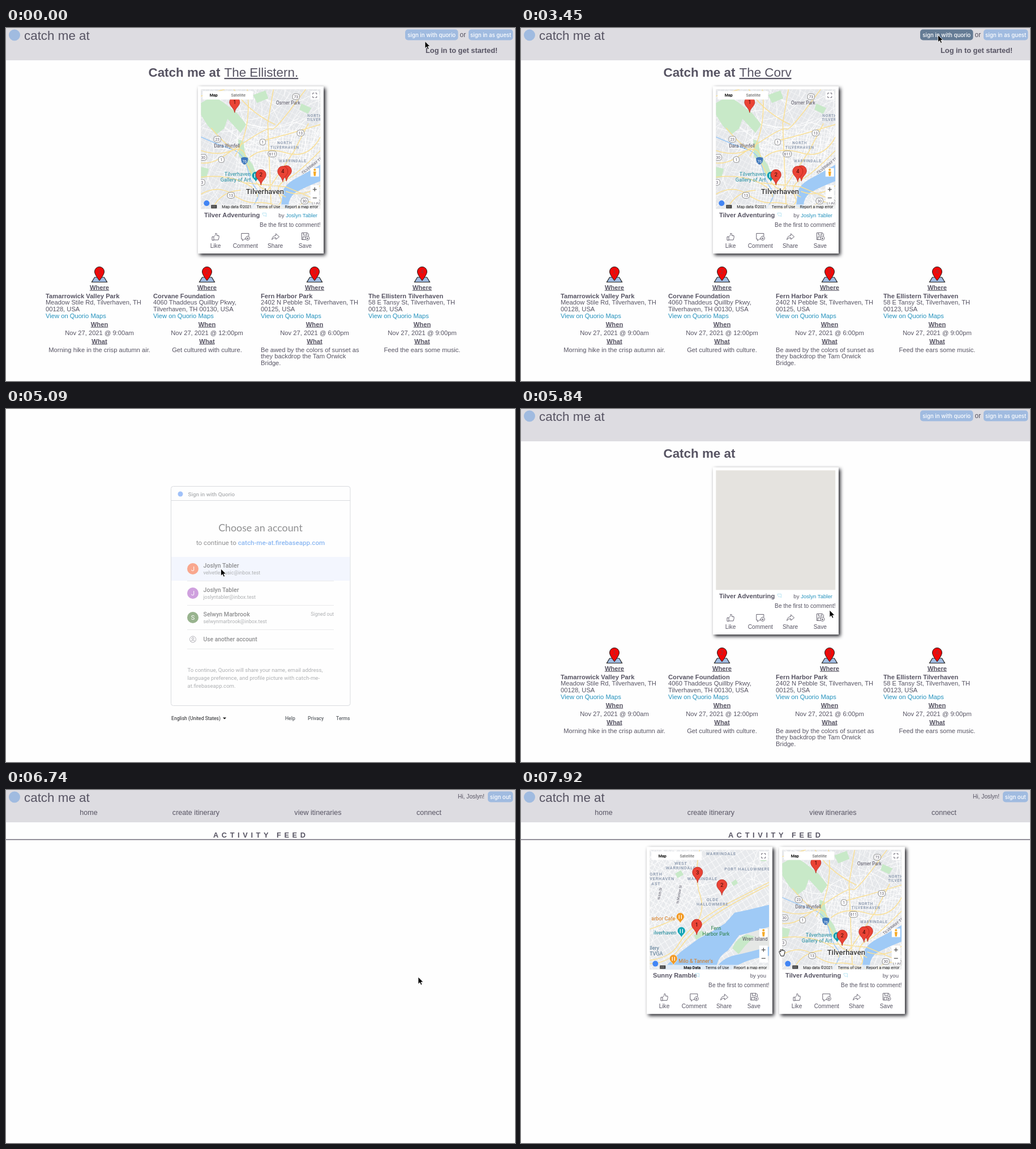
Recreate the animation shown at these times as an HTML page. Size 899 px wide and 623 px high, loop 8 s.

```html
<!DOCTYPE html>
<html lang="en">
<head>
<meta charset="utf-8">
<title>catch me at</title>
<style>
html, body { margin: 0; width: 100%; height: 100%; overflow: hidden; background: #fefefe; }
svg { display: block; font-family: "Liberation Sans", Arial, sans-serif; }
text { fill: #575463; white-space: pre; }
.b { font-weight: 700; }
.u { text-decoration: underline; }
.m { text-anchor: middle; }
.e { text-anchor: end; }
.link { fill: #2492bd; }
.btn text { font: 500 9.7px Inter, sans-serif; fill: #fff; }
.rob, .map { font-family: Roboto, sans-serif; }
.rob text { fill: #202124; }
.rob .soft { fill: #5f6368; }
.rob .url { fill: #1a73e8; font-weight: 500; }
.card { filter: drop-shadow(3px 3px 3px #1c1c22); }
.area { fill: #8493aa; letter-spacing: .8px; font-weight: 500; }
.ctl text { fill: #111; }
.icon { fill: none; stroke: #575463; stroke-width: .9; stroke-linejoin: round; }
.road { fill: none; stroke: #fff; }
.hwy { fill: none; stroke: #fae096; stroke-width: 1.5; }
</style>
</head>
<body>
<svg id="stage" width="899" height="623" viewBox="0 0 899 623"></svg>
<script>
const stage = document.getElementById('stage');
const text = (x, y, s, size = 11.2, cls = '', more = '') =>
  `<text x="${x}" y="${y}" font-size="${size}" class="${cls}" ${more}>${s}</text>`;
const rect = (x, y, w, h, fill, more = '') =>
  `<rect x="${x}" y="${y}" width="${w}" height="${h}" fill="${fill}" ${more}/>`;
const circle = (x, y, r, fill, more = '') => `<circle cx="${x}" cy="${y}" r="${r}" fill="${fill}" ${more}/>`;
const path = (d, more = '') => `<path d="${d}" ${more}/>`;
const group = (body, more = '') => `<g ${more}>${body}</g>`;
const at = (x, y, body, more = '') => group(body, `transform="translate(${x} ${y})" ${more}`);
const button = (x, w, label, id = '') =>
  group(rect(x, 2.5, w, 19, '#a0bbe0', `rx="5" id="${id}"`) + text(x + w / 2, 15.7, label, 9.7, 'm'), 'class="btn"');

// ---- maps
let seed = 7;
const rnd = () => (seed = seed * 16807 % 2147483647) / 2147483647;
const lanes = n => {
  let d = '';
  for (let i = 0; i < n; i++) {
    const x = rnd() * 211, y = rnd() * 211, a = rnd() * 7, l = 25 + rnd() * 50;
    d += `M${x} ${y}q${l * Math.cos(a)} ${l * Math.sin(a)} ${l * Math.cos(a + .5) * 1.8} ${l * Math.sin(a + .5) * 1.8}`;
  }
  return path(d, 'class="road" stroke-width="1"');
};
const grid = (id, gap, turn) =>
  `<pattern id="${id}" width="${gap}" height="${gap * 1.4}" patternUnits="userSpaceOnUse" patternTransform="rotate(${turn})">` +
  path(`M0 0H${gap}M0 0V${gap * 1.4}`, 'class="road" stroke-width="1.5"') + '</pattern>';
const green = d => path(d, 'fill="#c8e9c8"');
const water = d => path(d, 'fill="#9fcaf6"');
const shield = (n, x, y) => {
  const w = 8 + String(n).length * 2.2;
  return rect(x - w / 2, y - 5.2, w, 10.4, '#fff', 'rx="4" stroke="#777" stroke-width=".8"') + text(x, y + 2.5, n, 6.8, 'm');
};
const poi = (x, y, fill) =>
  at(x, y, path('M0 11C-1 6-7 4-7-1a7 7 0 0 1 14 0C7 4 1 6 0 11Z', `fill="${fill}" stroke="#fff" stroke-width=".6"`) +
    path('M-2-4V3M2-4V3', 'stroke="#fff" stroke-width="1.3"'));
const marker = (x, y, n) =>
  at(x, y, path('M0 0C-1.2-9-9-11-9-18.5a9 9 0 0 1 18 0C9-11 1.2-9 0 0Z', 'fill="#ea4335" stroke="#b7241b" stroke-width=".8"') +
    text(0, -15, n, 9.3, 'm', 'style="fill:#3a0b08"'));

const cityMap = () =>
  rect(0, 0, 211, 211, '#e5e7ea') + rect(0, 0, 211, 211, 'url(#g1)', 'opacity=".65"') +
  path('M62 90L118 72 211 65V150L140 200 60 205Z', 'fill="url(#g2)"') + lanes(75) +
  green('M0 24L22 12 38 22 64 42 80 62 70 77 58 64 47 52 41 69 27 80 12 64 0 45Z') +
  green('M66 88l9 4 3 22 14 20 7 20-8 4-10-22-14-18Z') + green('M92 10l22-8 5 14-20 8ZM177 25l18 8-6 10-15-7ZM0 137l14 3-4 15-10 2Z') +
  water('M211 133Q185 148 168 157T145 178L141 211H155Q153 190 169 181T211 162Z') +
  path('M0 84Q34 99 55 106T82 139 98 176 88 211', 'fill="none" stroke="#9fcaf6" stroke-width="1.5"') +
  path('M0 108Q30 118 55 108T80 130Q88 144 96 160T118 178 150 190M0 130Q20 132 40 118T90 85 125 70 170 20L185 0M104 92L150 80 211 62' +
    'M128 0L118 60 124 206M211 108Q170 150 150 160T140 190 100 211M80 165L150 172 211 198M0 185Q30 168 55 185T100 200 150 211' +
    'M58 0Q75 25 95 40T131 62M0 12L42 0M18 68Q40 95 60 108M150 180Q180 192 211 170M168 211Q185 190 211 204M86 120Q110 100 150 112T211 84' +
    'M0 155Q40 150 70 162T100 190M20 211Q35 180 70 178M60 118Q90 70 82 0M118 178L164 110 190 60', 'class="hwy"') +
  text(154, 27, 'Osmer Park', 8.2, 'm') + text(188, 49, 'NORTH', 6.6, 'area') + text(187, 56, 'TILVERHAVEN', 6.6, 'area') +
  text(46, 103, 'Dara Wynfell', 8.2, 'm') + text(148, 97, 'NORTH', 6.6, 'm area') + text(148, 104.5, 'TILVERHAVEN', 6.6, 'm area') +
  text(162, 129, 'WARRINDALE', 6.6, 'm area') + text(180, 150, 'TILVERWAY TPKE', 6.6, '', 'transform="rotate(-38 180 150)"') +
  [[73, 168, 13], [13, 176, 77], [1, 109, 93], [23, 29, 88], [611, 126, 114], [1, 36, 124], [30, 4, 120], [3, 2, 164], [13, 53, 187], [30, 183, 197], [130, 204, 200]]
    .map(s => shield(...s)).join('') +
  path('M71 121q6-3 12 0 1 9-6 12-7-3-6-12', 'fill="#3f78bd"') + text(77, 130, '76', 6.8, 'm', 'style="fill:#fff"') +
  poi(97, 153, '#129eaf') + text(88, 153, 'Tilverhaven', 9.2, 'e', 'style="fill:#218da0"') +
  text(88, 163, 'Gallery of Art', 9.2, 'e', 'style="fill:#218da0"') +
  text(113, 185, 'Tilverhaven', 13, 'm', 'style="fill:#333;font-weight:500;paint-order:stroke" stroke="#fff" stroke-width="1.5"');

const shoreMap = () =>
  rect(0, 0, 211, 211, '#e8eaed') + rect(0, 0, 211, 211, 'url(#g3)') +
  path('M0 0H62L102 60 62 130 0 150Z', 'fill="url(#g1)"') + lanes(16) +
  water('M211 97L174 106 150 111 133 130 112 143 86 157 55 180 22 211H118Q118 190 138 178L158 151 211 137Z') +
  path('M146 174Q153 156 171 149T211 136V174Q182 190 157 184Z', 'fill="#e5e7e5"') + green('M146 174Q153 156 171 149L185 153 169 169 157 184Z') +
  water('M116 211Q127 191 151 186T211 171V187Q165 194 145 211Z') +
  green('M78 151l14-9 5 7-15 10ZM45 42l10-6 5 8-11 6ZM144 58l8-6 4 7-8 5ZM196 7h10v13h-10Z') +
  path('M211 57Q175 76 145 91T89 126 50 168 0 195M211 62Q170 82 142 98T92 132 52 175 0 201M88 0Q78 48 89 80T74 140M0 140Q30 130 60 115', 'class="hwy"') +
  text(126, 9, 'WARRINDALE', 7.3, 'm area') + text(55, 26, 'WEST', 7.3, 'm area') + text(55, 34.5, 'WARRINDALE', 7.3, 'm area') +
  text(93, 53.5, 'WARRINDALE', 7.3, 'm area') + text(132, 36, 'PORT HALLOWMERE', 7.3, 'area') +
  text(0, 45, 'ORTH', 7.3, 'area') + text(0, 53.5, 'VERHAVEN', 7.3, 'area') + text(3, 62, 'AST', 7.3, 'area') +
  text(111, 90, 'OLDE', 7.3, 'm area') + text(111, 98.5, 'HALLOWMERE', 7.3, 'm area') +
  text(18, 88, 'N 6th St', 6, '', 'transform="rotate(-80 18 88)"') + text(51, 95, 'N Marlow St', 6, '', 'transform="rotate(-80 51 95)"') +
  text(45, 124, 'arbor Cafe', 9, 'e', 'style="fill:#d87816"') + poi(54, 119, '#f29922') +
  text(47, 149, 'ilverhaven', 9, 'e', 'style="fill:#128496"') + poi(56, 144, '#12a4b5') +
  text(117, 141, 'Fern', 9, 'm', 'style="fill:#2d8047"') + text(117, 151, 'Harbor Park', 9, 'm', 'style="fill:#2d8047"') +
  text(186, 160.5, 'Wren Island', 8.5, 'm') + text(0, 176, 'llery', 9, '', 'style="fill:#4f718d"') + text(0, 186, 'TVGA', 9, '', 'style="fill:#4f718d"') +
  poi(42, 193, '#f29922') + text(51, 199.5, "Milo &amp; Tanner's", 9, '', 'style="fill:#d87816"');

const controls = data =>
  rect(3, 3, 89, 15, '#fff', 'rx="1"') + text(22.5, 13.2, 'Map', 7.2, 'm b') + text(66, 13.2, 'Satellite', 7.2, 'm', 'style="fill:#555"') +
  rect(193.5, 3, 15, 15, '#fff') + path('M197.5 9V6.5H200M202 6.5h2.5V9M204.5 12v2.5H202M200 14.5h-2.5V12', 'class="icon"') +
  rect(193.5, 139, 15, 15, '#fff') + circle(201, 142, 2, '#f5aa28') + path('M198.5 145h5l-1 8h-3Z', 'fill="#f5aa28"') +
  rect(193.5, 169, 15, 30, '#fff') + path('M197.5 176.5h7M201 173v7M197.5 191.5h7', 'stroke="#555" stroke-width="1.3"') +
  rect(17, 203, 194, 8, '#f5f5f5', 'opacity=".75"') + circle(10, 201, 5, '#4285f4') +
  rect(18, 204, 10, 6, '#333') + path('M19.5 206h7M19.5 208h7', 'stroke="#fff" stroke-width=".8" stroke-dasharray="1 .8"') +
  data + text(98.5, 210, 'Terms of Use', 7) + text(207, 210, 'Report a map error', 7, 'e');

const actions = [
  ['Like', 'M-6 0h3V6h-3ZM-3 0L0-3V-6q3-1 2.5 4H6Q7 0 5 5.5H-3'],
  ['Comment', 'M1 4H-2L-5 7V4H-7V-6H6V-1M4-1a3.5 3.5 0 1 0 .1 0M4 1V4.5M2.3 2.8H5.7'],
  ['Share', 'M-6 5Q-5-2 1-2V-5.5L7 0 1 4.5V1.5Q-3 1-6 5Z'],
  ['Save', 'M1 5H-6V-7H4L6-5V-1M-3-7V-3H3V-7M-4 5V0H2M4-1a3.5 3.5 0 1 0 .1 0M4 1V4.5M2.3 2.8H5.7'],
];
const card = (x, y, id, title, iconX, by, tiles, pins, data) => at(x, y,
  rect(0, 0, 222, 295, '#fff', 'class="card"') + rect(5.3, 5.3, 211, 211, '#e5e3df') +
  `<svg class="map" x="5.3" y="5.3" width="211" height="211">` +
  group(tiles, `id="${id}Tiles"`) + group(pins, `id="${id}Pins"`) + group(controls(data), `id="${id}Ctl" class="ctl"`) + '</svg>' +
  text(11, 231, title, 11.2, 'b') + path(`M${iconX} 223.5h6.5v6.5l-2-2-2 1-2.5-4Z`, 'fill="none" stroke="#a9dff0" stroke-width=".8"') +
  text(211, 231, by, 9.6, 'e') + text(216.7, 247.8, 'Be the first to comment!', 10.2, 'e') +
  actions.map(([label, d], i) => at(31 + i * 52.8, 265.5, path(d, 'class="icon"') + text(0, 19.5, label, 10.2, 'm')))
    .join(''), `id="${id}"`);

const cityPins = marker(59.5, 41, 1) + marker(106, 169, 2) + marker(151, 162, 3) + marker(144.5, 163, 4);
const shorePins = marker(84.5, 58, 3) + marker(127.5, 80, 2) + marker(83, 150, 1);
const city = (x, y, id, by) =>
  card(x, y, id, 'Tilver Adventuring', 114, by, cityMap(), cityPins, text(37, 210, 'Map data ©2021', 7));

// ---- pages
const header = rect(0, 0, 899, 57, '#dddce1') + circle(15, 12.5, 10, '#a0bbe0') + text(32, 20.5, 'catch me at', 22.4);

const stops = [
  ['Tamarrowick Valley Park', 'Meadow Stile Rd, Tilverhaven, TH', '00128, USA', '9:00am', ['Morning hike in the crisp autumn air.']],
  ['Corvane Foundation', '4060 Thaddeus Quillby Pkwy,', 'Tilverhaven, TH 00130, USA', '12:00pm', ['Get cultured with culture.']],
  ['Fern Harbor Park', '2402 N Pebble St, Tilverhaven, TH', '00125, USA', '6:00pm',
    ['Be awed by the colors of sunset as', 'they backdrop the Tam Orwick', 'Bridge.']],
  ['The Ellistern Tilverhaven', '58 E Tansy St, Tilverhaven, TH', '00123, USA', '9:00pm', ['Feed the ears some music.']],
];
const stop = ([name, road, town, hour, what], i) => at(70 + i * 190, 0,
  path('M86.5 440h17l5 8.5h-27Z', 'fill="#a0bbe0" stroke="#222" stroke-width="1.2"') +
  path('M95 446Q86 434 86.5 430a8.5 8.5 0 0 1 17 0Q104 434 95 446Z', 'fill="#f00808" stroke="#222" stroke-width="1"') +
  text(95, 434, i + 1, 10, 'm', 'opacity=".6"') +
  text(95, 461.5, 'Where', 11.2, 'm b u') + text(0, 476.5, name, 11.2, 'b') + text(0, 488.2, road) + text(0, 499.8, town) +
  text(0, 511.5, 'View on Quorio Maps', 11.2, 'link') + text(95, 526.5, 'When', 11.2, 'm b u') +
  text(95, 541.5, `Nov 27, 2021 @ ${hour}`, 11.2, 'm') + text(95, 556.5, 'What', 11.2, 'm b u') +
  what.map((s, k) => what.length > 1 ? text(0, 571.5 + k * 11.7, s) : text(95, 571.5, s, 11.2, 'm')).join(''));

const landing = header + button(705, 93.5, 'sign in with quorio', 'signIn') + text(801.5, 15.5, 'or', 12) + button(817, 78.5, 'sign in as guest') +
  text(741, 44, 'Log in to get started!', 12.8, 'b', 'id="prompt"') +
  text(251.5, 86, 'Catch me at', 22.4, 'b') + text(385.5, 86, '', 22.4, 'u', 'id="typed"') +
  city(339, 103, 'home', 'by <tspan class="link">Joslyn Tabler</tspan>') + stops.map(stop).join('');

const account = (y, fill, name, mail) => circle(330, y, 10, fill) + text(330, y + 4, name[0], 11, 'm', 'style="fill:#fff"') +
  text(348.5, y - 2.3, name, 10.6, '', 'font-weight="500"') + text(348.5, y + 10, mail, 8.9, 'soft');
const login = rect(291.5, 136.5, 316.5, 387, '#fefefe', 'rx="4" stroke="#d9dbdf"') + path('M291.5 161.5H608', 'stroke="#d9dbdf"') +
  group(rect(292, 261, 315.5, 42, '#e8effe', 'id="hover"') +
    circle(308, 150, 4.5, '#4285f4') + text(321.5, 154, 'Sign in with Quorio', 9.8, 'soft', 'font-weight="500"') +
    text(449.5, 216, 'Choose an account', 17.8, 'm', 'font-family="Lato, sans-serif"') +
    text(449.5, 239.5, 'to continue to <tspan class="url">catch-me-at.firebaseapp.com</tspan>', 11.6, 'm') +
    account(282, '#f4511e', 'Joslyn Tabler', 'velvetlemusic@inbox.test') + account(325, '#a142bf', 'Joslyn Tabler', 'joslyntabler@inbox.test') +
    account(368, '#33691e', 'Selwyn Marbrook', 'selwynmarbrook@inbox.test') + text(579, 364.5, 'Signed out', 8.6, 'e soft') +
    at(330, 406.5, circle(0, 0, 5.5, 'none', 'class="icon"') + circle(0, -1.5, 1.8, 'none', 'class="icon"') + path('M-4 3.5Q0 0 4 3.5', 'class="icon"')) +
    text(348.5, 410, 'Use another account', 10.3, '', 'font-weight="500"') +
    path('M320 303.5H579M320 346.5H579M320 389.5H579M320 423.5H579', 'stroke="#d5d7db"') +
    ['To continue, Quorio will share your name, email address,', 'language preference, and profile picture with catch-me-', 'at.firebaseapp.com.']
      .map((s, i) => text(320.5, 464.3 + i * 14, s, 9.6, 'soft')).join(''), 'id="form"') +
  text(292, 549, 'English (United States)', 8.6) + path('M383 544.5h6l-3 3Z') +
  text(493, 549, 'Help', 8.6, 'soft', 'font-weight="500"') + text(533, 549, 'Privacy', 8.6, 'soft', 'font-weight="500"') +
  text(607.5, 549, 'Terms', 8.6, 'e soft', 'font-weight="500"');

const feed = header + text(845, 15.3, 'Hi, Joslyn!', 10.2, 'e') + button(851, 44.5, 'sign out') +
  [['home', 146], ['create itinerary', 335.5], ['view itineraries', 551], ['connect', 747]].map(([s, x]) => text(x, 44, s, 12.6, 'm')).join('') +
  text(366, 84, 'ACTIVITY FEED', 12.8, 'b', 'letter-spacing="5.6"') + path('M0 87.5H899', 'stroke="#6c6976" stroke-width="1.7"') +
  card(222, 100.3, 'left', 'Sunny Ramble', 86, 'by you', shoreMap(), shorePins, text(60, 210, 'Map Data', 7, 'b')) +
  city(456, 100.3, 'right', 'by you');

const arrow = path('M0 0V12.5L2.9 9.8 4.9 14.2 7 13.3 5.1 9H9Z', 'fill="#000" stroke="#fff" stroke-width=".8"');
const hand = path('M-4 1Q-6-2-4-3L-2-1-3-5Q-1-7 0-3 0-7 2-5L2.5-3Q5-5 5-1L4 3 3 6H-2Z', 'fill="#fff" stroke="#000" stroke-width=".9"');

stage.innerHTML = `<defs>${grid('g1', 7, 28)}${grid('g2', 5, 8)}${grid('g3', 9, -32)}</defs>` +
  group(landing, 'id="landing"') + group(login, 'id="login" class="rob"') + group(feed, 'id="feed"') +
  group(group(arrow, 'id="arrow"') + group(hand, 'id="hand"'), 'id="cursor"');

// ---- playback
const $ = id => document.getElementById(id);
const show = (id, on) => { $(id).style.display = on ? '' : 'none'; };
const last = (list, t) => list.filter(k => k[0] <= t).pop();
const words = [[-9999, 'The Ellistern.'], [150, 'Fern Harbor Park.'], [2700, 'The Corvane Foundation.'], [5840, ''], [5990, 'The Ellistern.']];
const moves = [[0, 740, 23.5], [150, 738, 17], [300, 736.5, 12.5], [4050, 590, 110], [4200, 461, 192], [4500, 432, 226], [4650, 398, 262],
  [4800, 379.5, 282], [5540, 430, 308], [5690, 490, 335], [5840, 545, 355], [5990, 586, 365.5], [6140, 640, 357], [6290, 688, 345],
  [6440, 716, 336], [6590, 728, 330], [7040, 748, 323], [7180, 762, 318], [7330, 769, 309], [7470, 770, 301], [7770, 600, 292], [7920, 461, 287]];

function draw(t) {
  show('landing', t < 3600 || t >= 5840 && t < 6440);
  show('login', t >= 4050 && t < 5540);
  show('feed', t >= 6440);
  show('prompt', t < 5000);
  const [start, word] = last(words, t);
  const step = Math.floor((t - start) / 150) * 150;
  $('typed').textContent = word.slice(0, Math.round(1 + step / 112.5));
  $('signIn').setAttribute('fill', t < 150 || t > 5000 ? '#a0bbe0' : t < 300 ? '#829bb9' : '#647b94');

  const parts = (id, tiles, pins) => {
    show(id + 'Tiles', tiles);
    show(id + 'Ctl', tiles);
    show(id + 'Pins', pins);
  };
  const homeReady = t < 5000 || t >= 6290;
  parts('home', homeReady, homeReady);
  show('left', t >= 7040);
  show('right', t >= 7180);
  for (const id of ['left', 'right']) parts(id, t >= 7330, t >= 7470);

  show('hover', t >= 5090);
  $('form').setAttribute('opacity', t >= 5090 ? .5 : 1);
  const [, x, y] = last(moves, t);
  $('cursor').setAttribute('transform', `translate(${x} ${y})`);
  show('hand', t >= 7770);
  show('arrow', t < 7770);
}

const begin = performance.now();
(function frame() {
  draw((performance.now() - begin) % 8000);
  requestAnimationFrame(frame);
})();
</script>
</body>
</html>
```
